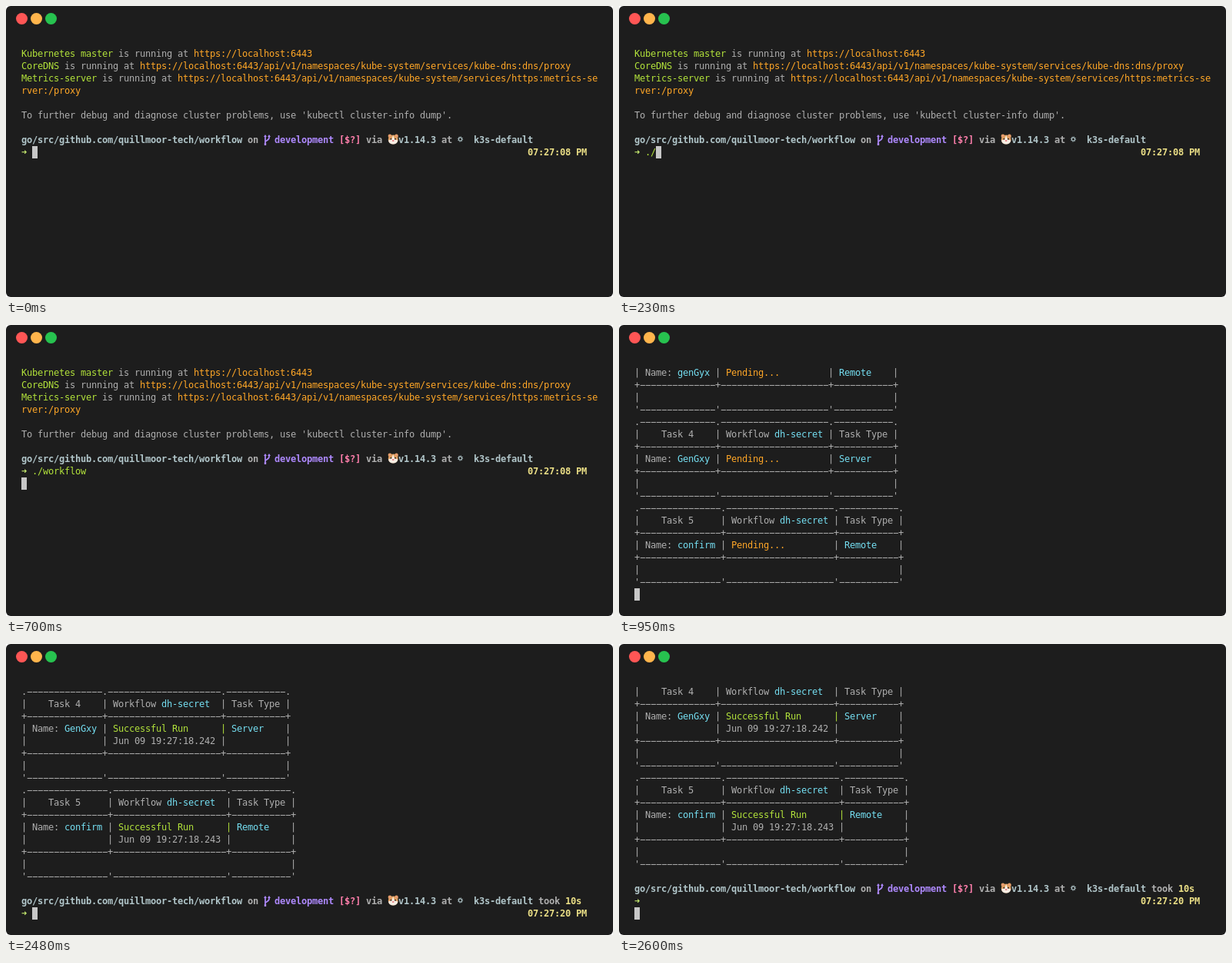
An HTML page for the animation above (4600 ms loop, 789 px wide and 378 px high).

```html
<!DOCTYPE html>
<html lang="en">
<head>
<meta charset="utf-8">
<title>Terminal workflow run</title>
<style>
  html, body { margin: 0; width: 100%; height: 100%; overflow: hidden; background: #fff; }
  #window {
    position: absolute; inset: 0; overflow: hidden;
    border-radius: 6px; background: #1d1d1d;
  }
  .button {
    position: absolute; top: 9px; width: 15px; height: 15px; border-radius: 50%;
  }
  #screen {
    position: absolute; left: 20px; top: 54px; margin: 0;
    font: 12px/16px "DejaVu Sans Mono", monospace;
    letter-spacing: calc(7px - 1ch);
    font-variant-ligatures: none;
    color: #afafaf;
  }
  .row { height: 16px; white-space: pre; }
  b { font-weight: 700; }
  .green { color: #b3e33b; }
  .orange { color: #ffa727; }
  .blue { color: #75dff2; }
  .purple { color: #ae89fe; }
  .pink { color: #ff7fac; }
  .pale { color: #b1c6ca; }
  .lime { color: #c8ed71; }
  .yellow { color: #ebdf86; }
  .cursor, .arrow { display: inline-block; width: 7px; height: 16px; vertical-align: top; }
  .cursor { background: #c7c7c7; }
  svg { height: 16px; vertical-align: top; overflow: visible; }
</style>
</head>
<body>
<div id="window">
  <i class="button" style="left:13px;background:#ff5655"></i>
  <i class="button" style="left:32px;background:#ffb54c"></i>
  <i class="button" style="left:51px;background:#27c24f"></i>
  <div id="screen"></div>
</div>
<script>
const LOOP = 4600;
const VISIBLE_ROWS = 19;

const paint = (color, text) => `<span class="${color}">${text}</span>`;
const bold = (color, text) => `<b class="${color}">${text}</b>`;
const icon = (cells, shapes) =>
  `<svg width="${cells * 7}" viewBox="0 0 ${cells * 7} 16">${shapes}</svg>`;

const cursor = '<span class="cursor"></span>';

const branchIcon = icon(1, `
  <g fill="none" stroke="#ae89fe" stroke-width="1.7">
    <path d="M2 3V14M2 11C2 8.5 7 9 7 5V3"/>
  </g>
  <path fill="#ae89fe" d="M0 4L2 1L4 4ZM5 4L7 1L9 4ZM.8 12H3.2V15H.8Z"/>`);

const hamsterIcon = icon(2, `
  <g fill="#e0a062"><circle cx="3" cy="3" r="2.4"/><circle cx="11.5" cy="3" r="2.4"/></g>
  <g fill="#f08d8d"><circle cx="3" cy="3" r="1.2"/><circle cx="11.5" cy="3" r="1.2"/></g>
  <ellipse cx="7.2" cy="7.5" rx="6.4" ry="6" fill="#e0a062"/>
  <path fill="#f7eee4" d="M7.2 2L9 7L13.4 8.5Q12.5 13.5 7.2 13.5T1 8.5L5.4 7Z"/>
  <g fill="#35251f"><circle cx="4.4" cy="6.8" r="1"/><circle cx="10" cy="6.8" r="1"/></g>
  <ellipse cx="7.2" cy="9" rx="1.3" ry=".9" fill="#e57980"/>`);

const wheelIcon = icon(1, `
  <g fill="none" stroke="#b1c6ca">
    <circle cx="3.5" cy="7" r="2.1" stroke-width="1.1"/>
    <circle cx="3.5" cy="7" r="3.2" stroke-width="1" stroke-dasharray="1 1.51"/>
  </g>`);

const prompt = (took = '') =>
  bold('pale', 'go/src/github.com/quillmoor-tech/workflow') + bold('', ' on ') +
  branchIcon + ' ' + bold('purple', 'development') + ' ' + bold('pink', '[$?]') +
  bold('', ' via ') + hamsterIcon + bold('pale', 'v1.14.3') + bold('', ' at ') +
  wheelIcon + '  ' + bold('pale', 'k3s-default') +
  (took && bold('', ' took ') + bold('yellow', took));

// The clock sits at column 94; arrow and space take the first two.
const input = (command, clock, active = true) =>
  bold('lime arrow', '➜') + ' ' + paint('green', command) + (active ? cursor : ' ') +
  ' '.repeat(94 - 3 - command.length) + bold('yellow', clock);

const rule = (corner, widths) =>
  corner + widths.map(width => '−'.repeat(width) + corner).join('');

// Pads by visible length, ignoring markup.
const cell = (html, width) =>
  html + ' '.repeat(width - html.replace(/<[^>]+>/g, '').length);

const tableRow = (cells, widths, lastBar = '|') => {
  const [a, b, c] = cells.map((text, i) => cell(text, widths[i]));
  return `|${a}|${b}${lastBar}${c}|`;
};

function taskTable({ id, name, type }, stamp) {
  const widths = [name.length + 8, stamp ? 21 : 20, 11];
  const status = stamp ? paint('green', 'Successful Run') : paint('orange', 'Pending...');
  const rows = [
    rule('.', widths),
    tableRow([`    Task ${id}`, ' Workflow ' + paint('blue', 'dh-secret'), ' Task Type'], widths),
    rule('+', widths),
    tableRow([' Name: ' + paint('blue', name), ' ' + status, ' ' + paint('blue', type)],
      widths, stamp ? paint('green', '|') : '|'),
  ];
  if (stamp) rows.push(tableRow(['', ` Jun 09 19:27:18.${stamp}`, ''], widths));
  const inner = widths.reduce((sum, width) => sum + width, 2);
  return rows.concat(rule('+', widths), `|${' '.repeat(inner)}|`, rule("'", widths));
}

const tasks = [
  { id: 3, name: 'genGyx', type: 'Remote' },
  { id: 4, name: 'GenGxy', type: 'Server' },
  { id: 5, name: 'confirm', type: 'Remote' },
];

const service = (name, url) =>
  paint('green', name) + ' is running at ' + paint('orange', 'https://localhost:6443' + url);
const api = '/api/v1/namespaces/kube-system/services/';

const clusterInfo = [
  service('Kubernetes master', ''),
  service('CoreDNS', api + 'kube-dns:dns/proxy'),
  service('Metrics-server', api + 'https:metrics-se'),
  paint('orange', 'rver:/proxy'),
  '',
  "To further debug and diagnose cluster problems, use 'kubectl cluster-info dump'.",
  '',
  prompt(),
];

const startClock = '07:27:08 PM';
const endClock = '07:27:20 PM';
const typing = command => [...clusterInfo, input(command, startClock)];
const pending = tasks.flatMap(task => taskTable(task));
const finished = tasks.flatMap((task, i) => taskTable(task, 241 + i));
const done = [...finished, '', prompt('10s')];

const scenes = [
  [0, typing('')],
  [230, typing('./')],
  [330, typing('./work')],
  [430, typing('./workflow')],
  [700, [...clusterInfo, input('./workflow', startClock, false), cursor]],
  [950, [...pending, cursor]],
  [2270, [...finished, cursor]],
  [2480, [...done, input('', endClock)]],
  [2600, [...done, input('', endClock, false), cursor]],
].map(([at, rows]) => ({
  at,
  html: rows.slice(-VISIBLE_ROWS).map(row => `<div class="row">${row}</div>`).join(''),
}));

const screen = document.getElementById('screen');
let shown, start;

function show(scene) {
  if (scene === shown) return;
  shown = scene;
  screen.innerHTML = scene.html;
}

function tick(now) {
  start ??= now;
  const time = (now - start) % LOOP;
  show(scenes.findLast(scene => scene.at <= time) || scenes[0]);
  requestAnimationFrame(tick);
}

show(scenes[0]);
requestAnimationFrame(tick);
</script>
</body>
</html>
```
